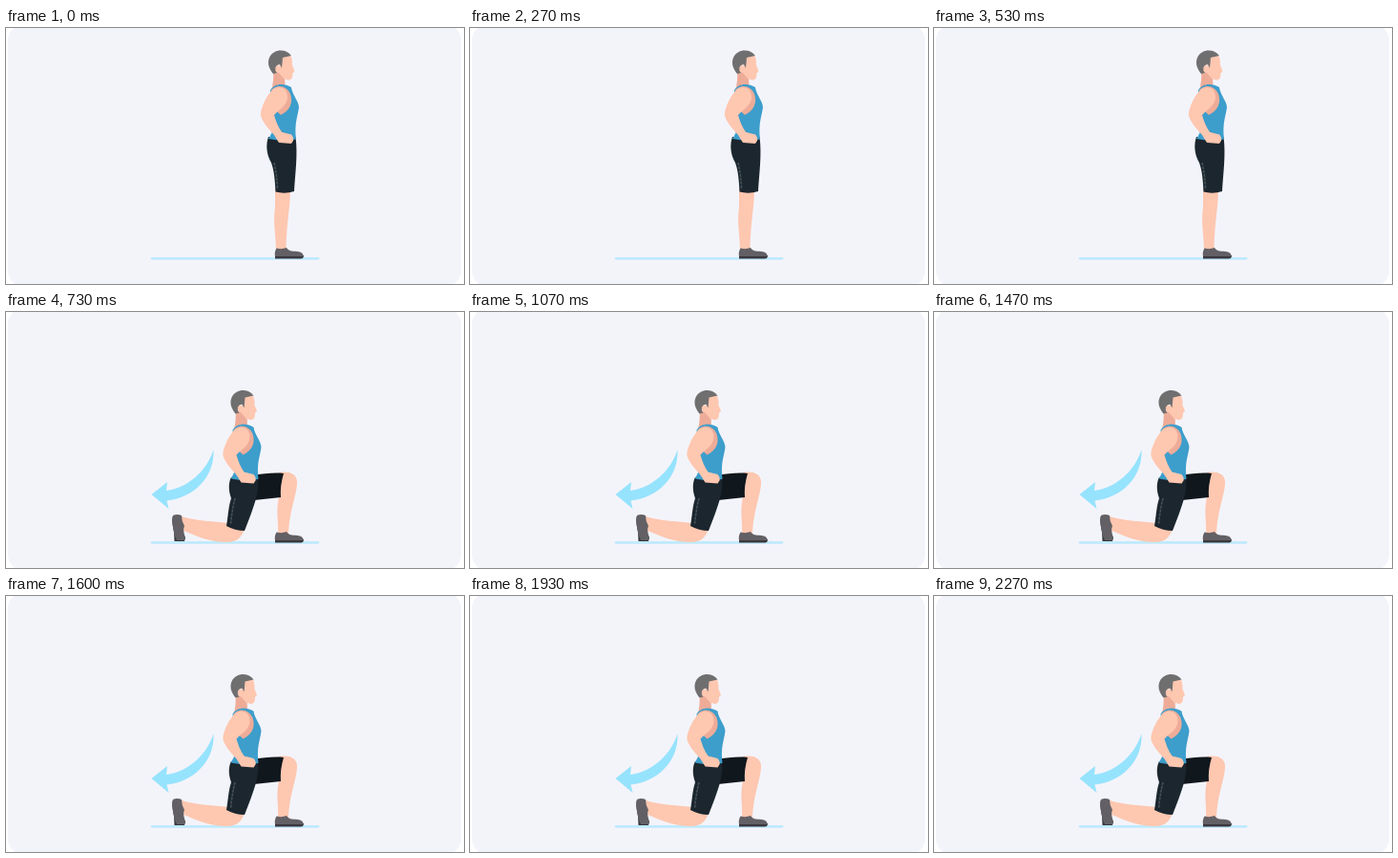
Animation of 480 by 268 pixels, one loop 2.34 s. Source, as an HTML page:

```html
<!DOCTYPE html>
<html lang="en">
<head>
<meta charset="utf-8">
<title>Lunge exercise</title>
<style>
  html, body { margin: 0; width: 100%; height: 100%; overflow: hidden; background: #fff; }
  svg { display: block; width: 100vw; height: 100vh; }
  .skin { fill: #fec7b0; }
  .shade { fill: #eeac98; }
  .shirt { fill: #3d9ecb; }
  .hair { fill: #706f70; }
  .shorts { fill: #1b262e; }
  .far { fill: #10171d; }
  .shoe { fill: #626065; }
  .sole { fill: #38383d; }
  .seam { fill: none; stroke: #4a535a; stroke-width: 1.5; stroke-dasharray: 3 1; }
</style>
</head>
<body>
<svg viewBox="0 0 480 268">
  <rect x="2" y="-4" width="475" height="275" rx="17" fill="#f3f4fa"/>
  <path d="M153 241.3H327" stroke="#bfeafd" stroke-width="2.7" stroke-linecap="round"/>

  <g id="standing">
    <path class="skin" d="M282 168H298C298 187 294 204 293.500 233H283C283 217 279.500 204 282 187Z"/>
    <path class="shorts" d="M275 114H303.500C306 132 303 153 302 171Q292 174 282.500 171.500C282 160 281 149 278 141C273 133 272 122 275 114Z"/>
    <path class="seam" d="M281 141Q284 154 284.500 168"/>
  </g>

  <g id="lunge">
    <path d="M217.500 144C211 165 192 184 168 187L169 178L152.500 191L170.500 206L168.500 197.500C195 195 219 174 217.500 144Z" fill="#96e3fd"/>
    <path class="skin" d="M286 168C299 166 306 171 305 180C304 194 297 208 296 233H285C286 218 282 207 287 190Z"/>
    <path class="far" d="M257 171C271 169 282 168 291 169Q287 182 288 194L260 197Z"/>
    <path class="skin" d="M184 214C202 219 217 219 232 221L250 227C247 236 242 241 231 241C215 241 200 235 184 228Z"/>
    <path class="shorts" d="M236 173L264 175C266 187 260 204 250 229Q240 229 231 224C233 213 233 204 236 195C233 187 233 179 236 173Z"/>
    <path class="seam" d="M240 195Q237 207 235.500 222"/>
    <path class="sole" d="M175 213Q173 218 176 230L176.500 240H187L188 236Z"/>
    <path class="shoe" d="M175 213Q179 211 184 213Q184 219 187 224C184 230 190 237 187 239H179C175 231 174 221 175 213Z"/>
  </g>

  <path class="sole" d="M282 238H312Q312 241.500 309 241.500H282Z"/>
  <path class="shoe" d="M283.500 230.500Q289 232 294 230C297 235 302 233 308 234.500Q312 236 311.500 239H282Q281 235 283.500 230.500Z"/>

  <g id="torso">
    <path class="shade" d="M280 44L292 49L292.500 62L278 66Q281 55 280 44Z"/>
    <path class="skin" d="M287 30L298.500 29Q300.500 34 300 39L302.500 45L300.500 47.500Q301 54 296 54.500L291 53L286 47Z"/>
    <path class="hair" d="M299 29C293 21 280 22 276 31C273 38 277 44 280 48L284 47V39L287 38L289 42L290 31Z"/>
    <ellipse class="skin" cx="284.800" cy="43" rx="2.500" ry="3.700"/>
    <path class="shirt" d="M277 65C281 58 291 57 299 62C300 70 307 77 307 83C306 92 302 99 304 116.500Q290 119 275 116C280 109 282 101 280 92Z"/>
    <path class="shade" d="M278 65C285 58 294 61 298 69C301 78 298 86 288 91L278 82Z"/>
    <path class="skin" d="M279 65C287 59 294 63 295 71C296 80 287 85 281 91C283 98 285 103 289 109L299 111.500Q302 115 301 118L299 121L286 120L281 112C275 105 269 99 267 92C266 86 272 72 279 65Z"/>
  </g>
</svg>
<script>
  const LOOP = 2340, DROP = 730;
  const [standing, lunge, torso] = ["standing", "lunge", "torso"].map(id => document.getElementById(id));
  const show = (part, on) => part.setAttribute("visibility", on ? "visible" : "hidden");

  function draw() {
    const down = performance.now() % LOOP >= DROP;
    show(standing, !down);
    show(lunge, down);
    torso.setAttribute("transform", down ? "translate(-39.500 58.500)" : "");
    requestAnimationFrame(draw);
  }
  draw();
</script>
</body>
</html>
```
